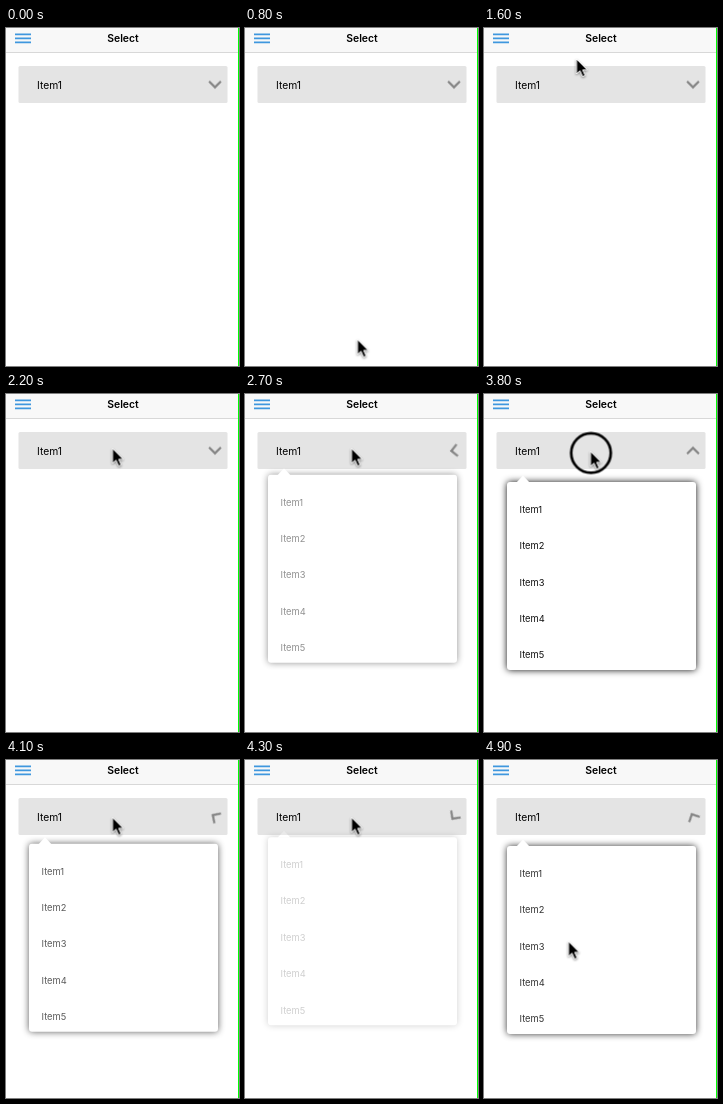
Recreate the animation shown at these times as an HTML page. Size 233 by 338 pixels, loop 5000 ms.

```html
<!DOCTYPE html>
<html lang="en">
<head>
<meta charset="utf-8">
<title>Select</title>
<style>
  html, body { margin: 0; width: 100%; height: 100%; overflow: hidden; background: #fff; }
  svg { display: block; width: 233px; height: 338px; }
  text { font-family: Inter, "Liberation Sans", sans-serif; }
  .title { font-size: 10.4px; font-weight: 600; text-anchor: middle; }
  .value { font-size: 10.3px; }
  #items { font-size: 9.3px; fill: #111; }
  .panel { filter: drop-shadow(0 .5px 3.7px rgba(0, 0, 0, .95)); }
  #arrow { filter: drop-shadow(0 1px 1.2px rgba(0, 0, 0, .45)); }
</style>
</head>
<body>
<svg viewBox="0 0 233 338">
  <rect width="233" height="24" fill="#f8f8f8"/>
  <rect y="24" width="233" height="1" fill="#d8d8d8"/>
  <path d="M9 6.3H25M9 10.3H25M9 14.3H25" stroke="#3f97de" stroke-width="1.7"/>
  <text class="title" x="117" y="13.5">Select</text>

  <rect x="12.5" y="38" width="209" height="37" rx="1.5" fill="#e4e4e4"/>
  <text class="value" x="31" y="60.6">Item1</text>
  <g transform="translate(209 56.6)">
    <path id="chevron" d="M-5.9 -3.2L0 2.6L5.9 -3.2" fill="none" stroke="#858585" stroke-width="2.2"/>
  </g>

  <g id="menu">
    <rect class="panel" x="23" y="88" width="189" height="188" rx="3" fill="#fff"/>
    <path d="M32.5 88.5L39 81.5L45.5 88.5Z" fill="#fff"/>
    <g id="items"></g>
  </g>

  <rect x="232" width="1" height="338" fill="#0f0"/>
  <g id="cursor">
    <circle id="ring" cx=".5" cy="1.6" r="19.8" fill="none" stroke="#000" stroke-width="2.7"/>
    <path id="arrow" d="M0 0V15L3.5 11.8L6.1 17.6L8.7 16.4L6.2 10.9H10.8Z" stroke="#fff"/>
  </g>
</svg>
<script>
  const LOOP = 5000, STEP = 100, FADE = 500, PRESS = 100;
  const $ = id => document.getElementById(id);
  const clamp = v => Math.min(1, Math.max(0, v));

  for (let i = 0; i < 5; i++) {
    const label = document.createElementNS("http://www.w3.org/2000/svg", "text");
    label.setAttribute("x", 35.5);
    label.setAttribute("y", 118.8 + i * 36.4);
    label.textContent = "Item" + (i + 1);
    $("items").append(label);
  }

  // Cursor stops: [ms, x, y]
  const stops = [
    [400, 113, 327], [500, 113, 313.5], [700, 113, 313.5], [800, 112.5, 311.5],
    [1300, 97.5, 230], [1600, 92.5, 31], [1900, 113, 36], [2200, 106.5, 54.4],
    [2700, 106.5, 54.4], [2900, 106.5, 57.4], [4400, 106.5, 57.4], [4900, 84.5, 181.4]
  ];

  function cursorAt(t) {
    const i = stops.findIndex(s => s[0] >= t);
    if (i === 0 && t < stops[0][0]) return [-60, -60];
    if (i <= 0) return stops[0].slice(1);
    const [t0, x0, y0] = stops[i - 1], [t1, x1, y1] = stops[i];
    const k = (t - t0) / (t1 - t0);
    return [x0 + (x1 - x0) * k, y0 + (y1 - y0) * k];
  }

  const ease = (t, start) => clamp((t - start) / FADE) ** 1.5;
  const openAt = t => ease(t, 2400) - ease(t, 3870) + ease(t, 4450);
  const pressed = t => [2300, 3800].some(s => t >= s && t < s + PRESS);

  // Samples a pose rule once per step and holds each pose.
  function play(id, pose) {
    const frames = [];
    for (let t = 0; t <= LOOP; t += STEP) {
      frames.push({ offset: t / LOOP, easing: "step-end", ...pose(Math.min(t, LOOP - STEP)) });
    }
    $(id).animate(frames, { duration: LOOP, iterations: Infinity }).startTime = 0;
  }

  play("cursor", t => {
    const [x, y] = cursorAt(t);
    return { transform: `translate(${x}px, ${y}px)` };
  });
  play("ring", t => ({ opacity: +pressed(t) }));
  play("menu", t => ({ opacity: openAt(t), transform: `translateY(${13.6 * (openAt(t) - 1)}px)` }));
  play("chevron", t => ({ transform: `rotate(${180 * openAt(t)}deg)` }));
</script>
</body>
</html>
```
